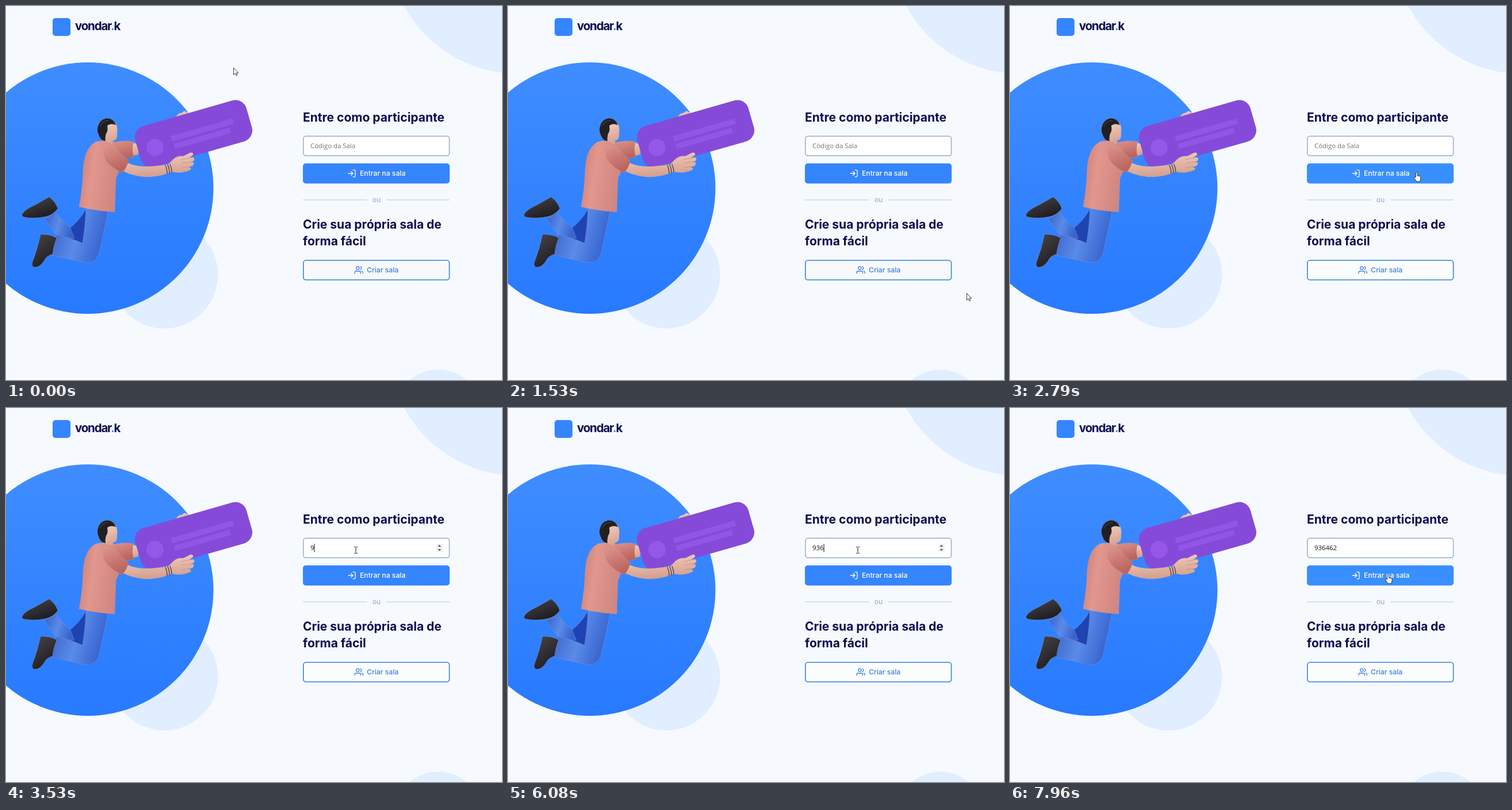
Recreate the animation shown at these times as an HTML page. Size 862 by 650 pixels, loop 8000 ms.

```html
<!DOCTYPE html>
<html lang="pt">
<head>
<meta charset="utf-8">
<title>Entrar na sala</title>
<style>
  html, body { margin: 0; width: 100%; height: 100%; overflow: hidden; background: #f6faff; }
  svg { display: block; }
  text { font-family: Inter, sans-serif; }
  .title { font-size: 21px; font-weight: 700; fill: #0e0b4f; }
  .label { font-size: 12.2px; font-weight: 500; }
  .field { font: 11.4px "Open Sans", sans-serif; }
  .icon { fill: none; stroke-width: 2; stroke-linecap: round; stroke-linejoin: round; }
  .tint { fill: #e1eeff; }
  .line { fill: none; stroke-linecap: round; }
  #person > path { stroke: #bfa3a6; stroke-opacity: .35; stroke-width: .8; stroke-linejoin: round; }
</style>
</head>
<body>
<svg width="862" height="650" viewBox="0 0 862 650">
  <defs>
    <linearGradient id="blue" x2="0" y2="1"><stop stop-color="#3f8dff"/><stop offset="1" stop-color="#287aff"/></linearGradient>
    <linearGradient id="shirt" x2="1" y2=".25"><stop stop-color="#c97a74"/><stop offset=".4" stop-color="#e2978d"/><stop offset="1" stop-color="#cf8580"/></linearGradient>
    <linearGradient id="sleeve" x2=".4" y2="1"><stop stop-color="#df948a"/><stop offset="1" stop-color="#b9645f"/></linearGradient>
    <linearGradient id="skin" x2=".2" y2="1"><stop stop-color="#f3d0c1"/><stop offset="1" stop-color="#d5a090"/></linearGradient>
    <linearGradient id="jeans" x2="1" y2=".3"><stop stop-color="#365fc9"/><stop offset=".55" stop-color="#5a8be8"/><stop offset="1" stop-color="#3765d0"/></linearGradient>
    <linearGradient id="shoe" x2=".6" y2="1"><stop stop-color="#4a484b"/><stop offset="1" stop-color="#1d1b1f"/></linearGradient>
  </defs>

  <rect width="862" height="650" fill="#f6faff"/>
  <circle class="tint" cx="890" cy="-107.6" r="225.4"/>
  <circle class="tint" cx="751" cy="708" r="76"/>
  <circle class="tint" cx="275" cy="467" r="93.5"/>
  <circle cx="142" cy="316.5" r="218.5" fill="url(#blue)"/>

  <rect x="81" y="21" width="31" height="31" rx="5" fill="#3585ff"/>
  <text x="120" y="42" font-size="20.5" font-weight="700" letter-spacing="-1.2" fill="#0e0b4f">vondar<tspan fill="#3585ff">.</tspan>k</text>

  <g id="person">
    <!-- far leg and shoe -->
    <path fill="#1f43b2" d="M108 388Q126 376 139 353L160 370 136 414 104 406Z"/>
    <path fill="url(#jeans)" d="M67 369Q78 366 85 357Q98 374 112 386L119 404 90 402Q76 384 67 369Z"/>
    <path fill="url(#shoe)" d="M28 362Q32 354 50 346L75 332Q86 340 90 352Q82 363 69 366 50 370 32 367 27 366 28 362Z"/>
    <!-- near leg and shoe -->
    <path fill="url(#jeans)" d="M139 350L177 357Q172 384 164 418 161 440 150 444 143 448 128 444L81 433Q79 414 88 397Q112 403 133 412 138 382 139 350Z"/>
    <path fill="url(#shoe)" d="M60 397Q76 396 88 403 82 418 81 431 70 434 66 443 58 455 49 454 44 452 46 445 55 422 60 397Z"/>
    <!-- far arm -->
    <path fill="url(#skin)" d="M214 237Q224 236 230 243V258L214 262Z"/>
    <path fill="url(#sleeve)" d="M182 238Q206 232 222 236 218 248 222 263L202 266Z"/>
    <path fill="url(#skin)" d="M294 196Q298 185 305 186 311 180 313 184 318 184 318 190L308 200Z"/>
    <!-- card -->
    <g transform="translate(326 222) rotate(-16)">
      <rect x="-100.5" y="-37" width="201" height="74" rx="20" fill="#864ad8"/>
      <circle cx="-71" cy="4.5" r="15" fill="#9457e8"/>
      <path d="M-39 -2H72.5M-38 12H63" stroke="#9256e6" stroke-width="9.5"/>
    </g>
    <!-- head -->
    <path fill="url(#skin)" d="M172 222L166 240Q176 247 186 238L186 234Q194 233 193 222 195 204 186 201L174 205Z"/>
    <path fill="#211f22" d="M159 212Q162 197 175 195 187 195 191 207 182 203 176 208 178 217 174 222 172 230 173 235 164 234 161 224 158 218 159 212Z"/>
    <path class="line" d="M163 209Q168 199 178 199" style="stroke:#777;stroke-width:1.3"/>
    <!-- torso -->
    <path fill="url(#shirt)" d="M156 236Q170 232 184 240 197 250 201 264L196 288 191 300Q190 330 189 358 156 356 127 349 133 318 134 284 136 247 156 236Z"/>
    <!-- near arm -->
    <path fill="url(#skin)" d="M202 268Q218 278 240 279 262 279 282 275L291 266Q298 260 308 261L320 255Q326 254 325 259L318 264 325 263Q329 265 326 269L319 272 325 271Q328 274 324 278L317 280Q324 281 320 285 305 292 288 288 266 298 240 297 212 294 195 282Z"/>
    <path class="line" d="M305 267L319 264M307 273L320 271M306 281L318 279" style="stroke:#bd8373;stroke-opacity:.8"/>
    <path class="line" d="M277 277Q280 283 280 291M281 276Q284 282 284 290M285 275Q288 282 288 288" style="stroke:#3b3a45;stroke-opacity:.9;stroke-width:1.4"/>
    <path fill="url(#sleeve)" d="M171 243Q181 240 192 249L213 269Q210 281 202 290 188 284 176 272 164 256 171 243Z"/>
  </g>

  <text class="title" x="516" y="201">Entre como participante</text>
  <rect x="516.8" y="226.3" width="253.7" height="34" rx="4.5" fill="#fefeff" stroke="#9babc9" stroke-width="1.5"/>
  <text class="field" id="hint" x="529" y="247" fill="#77737c">Código da Sala</text>
  <text class="field" id="code" x="529" y="247" fill="#161616"></text>
  <rect id="caret" y="236" width="1" height="14.5" fill="#111"/>
  <g id="spin">
    <rect x="748" y="236" width="10.5" height="14" fill="#eef0f2"/>
    <path d="M750.5 241l2.8-3.2 2.8 3.2zM750.5 245.2l2.8 3.2 2.8-3.2z" fill="#46515f"/>
  </g>

  <rect id="enter" x="516" y="273.5" width="255" height="35" rx="5"/>
  <path class="icon" stroke="#fff" transform="translate(593.3 283.2) scale(.65)" d="M15 3h4a2 2 0 0 1 2 2v14a2 2 0 0 1-2 2h-4M10 17l5-5-5-5M15 12H3"/>
  <text class="label" x="615" y="295" fill="#fff">Entrar na sala</text>

  <path d="M516 337H627.5M661 337H771" stroke="#b9c8dd" stroke-width="1.2"/>
  <text x="636.7" y="341" font-size="12" font-weight="500" fill="#9fb2cf">ou</text>

  <text class="title" x="516" y="387">Crie sua própria sala de</text>
  <text class="title" x="516" y="416">forma fácil</text>
  <rect id="create" x="516.8" y="442" width="253.7" height="34" rx="4.5" stroke="#397fe0" stroke-width="1.6"/>
  <path class="icon" stroke="#3d7fe8" transform="translate(605.4 451) scale(.65)" d="M17 21v-2a4 4 0 0 0-4-4H5a4 4 0 0 0-4 4v2M23 21v-2a4 4 0 0 0-3-3.87M16 3.13a4 4 0 0 1 0 7.75M13 7a4 4 0 1 1-8 0 4 4 0 0 1 8 0"/>
  <text class="label" x="627" y="463" fill="#3d7fe8">Criar sala</text>

  <g id="cursor" stroke-linejoin="round">
    <path id="arrow" fill="#fff" stroke="#222" stroke-width=".9" d="M.5 .5v12l2.8-2.6 1.9 4 1.8-.8-1.8-3.9h3.6z"/>
    <path id="hand" fill="#fff" stroke="#222" stroke-width=".9" d="M-1.6 9V1.2a1.4 1.4 0 0 1 2.8 0V6l4.8 1q1.3.4 1.1 1.8l-.5 4-1 3.2h-5.8l-4-5.4q-1-1.7.5-2.1z"/>
    <path id="beam" fill="none" stroke="#222" d="M-3-5.5h2L0-4.5 1-5.5h2M0-4.5v9M-3 5.5h2L0 4.5 1 5.5h2"/>
  </g>
</svg>
<script>
const LOOP = 8000;
const $ = id => document.getElementById(id);
const show = (id, on) => $(id).setAttribute('visibility', on ? 'visible' : 'hidden');

// pointer path: time, x, y
const path = [
  [0, 395, 107], [70, 395, 109], [400, 396, 310], [700, 422, 489], [840, 574, 543],
  [910, 620, 547], [1100, 735, 530], [1330, 799, 504], [1460, 799, 504], [1530, 797, 499],
  [1800, 705, 464], [2100, 690, 457], [2290, 745, 450], [2400, 811, 400], [2600, 770, 322],
  [2790, 707, 289], [3080, 690, 289], [3180, 672, 286], [3400, 608, 247], [3450, 608, 247],
  [7300, 608, 247], [7340, 608, 247], [7600, 640, 280], [7960, 657, 289], [8000, 657, 289]
];
const keys = [[3480, '9'], [3730, '3'], [4810, '6'], [6160, '4'], [6540, '6'], [6870, '2']];
const caretOn = [[3400, 4350], [4810, 5550], [6080, 7340]];

const slope = (i, k) => {
  const a = path[Math.max(i - 1, 0)], b = path[Math.min(i + 1, path.length - 1)];
  return (b[k] - a[k]) / (b[0] - a[0]);
};

function pointer(t) {
  const i = path.findIndex((p, n) => n && t <= p[0]) - 1;
  const a = path[i], b = path[i + 1], d = b[0] - a[0], u = (t - a[0]) / d;
  return [1, 2].map(k =>
    a[k] + (b[k] - a[k]) * u * u * (3 - 2 * u)
    + d * u * (1 - u) * (slope(i, k) * (1 - u) - slope(i + 1, k) * u));
}

function draw(now) {
  const t = now % LOOP;
  const [x, y] = pointer(t);
  const over = (top, bottom) => x > 516 && x < 771 && y > top && y < bottom;
  const onInput = over(226, 261), onEnter = over(273, 309), onCreate = over(441, 477);
  const typed = keys.filter(k => k[0] <= t).map(k => k[1]).join('');

  $('code').textContent = typed;
  $('caret').setAttribute('x', 529 + (typed ? $('code').getComputedTextLength() : 0));
  show('caret', caretOn.some(([from, to]) => t >= from && t < to));
  show('hint', !typed);
  show('spin', onInput);

  $('enter').setAttribute('fill', onEnter ? '#398fff' : '#3585ff');
  $('create').setAttribute('fill', t < 1600 ? '#f8f9fa' : '#fbfcfc');

  $('cursor').setAttribute('transform', `translate(${x} ${y})`);
  show('hand', onEnter || onCreate);
  show('beam', onInput);
  show('arrow', !onInput && !onEnter && !onCreate);
  requestAnimationFrame(draw);
}
requestAnimationFrame(draw);
</script>
</body>
</html>
```
